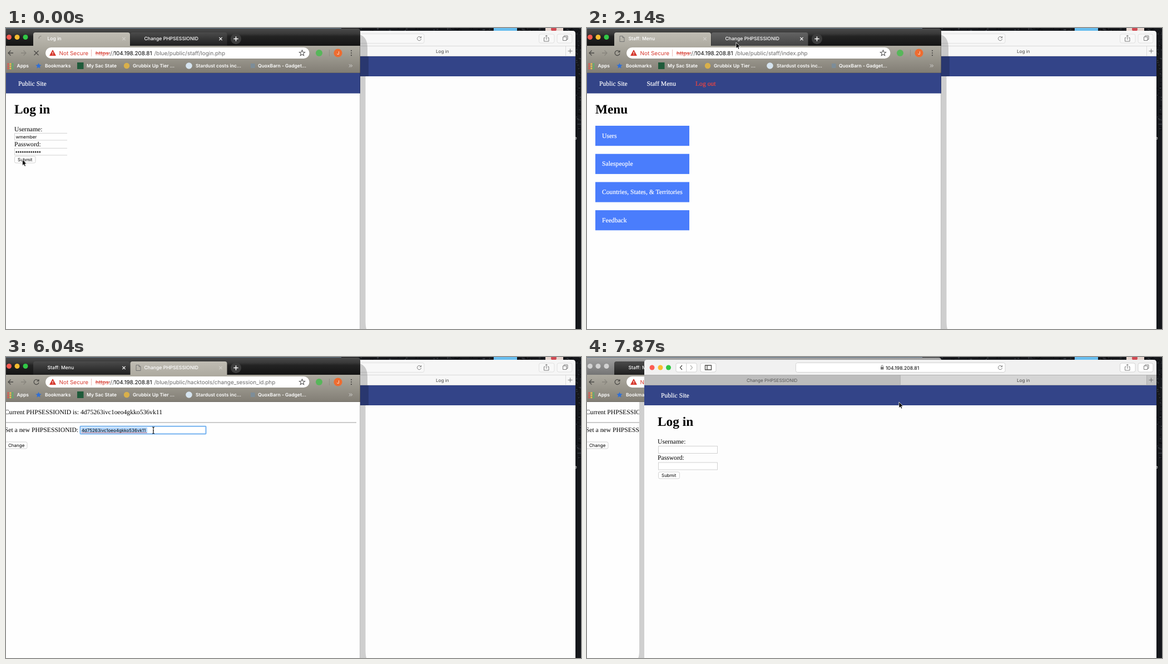
These frames come from a looping animation (1034x542 px, 8000 ms). An HTML page:

```html
<!DOCTYPE html>
<html lang="en">
<head>
<meta charset="utf-8">
<title>Session demo</title>
<style>
html, body { margin: 0; width: 100%; height: 100%; overflow: hidden; background: #15171b; }
svg { display: block; width: 1034px; height: 542px; text-rendering: geometricPrecision; }
text { font: 11.65px "Liberation Serif", Times, serif; white-space: pre; }
.h1 { font-size: 23.3px; font-weight: bold; }
.nav { fill: #fff; stroke: #fff; stroke-width: .2; }
.red { fill: #f4453f; stroke: #f4453f; }
.ui { font: 8px Inter, "Open Sans", sans-serif; }
.tab, .mark { font: 500 8.6px Inter, "Open Sans", sans-serif; fill: #fff; }
.mark { font-weight: 600; font-size: 8.5px; }
.url { font: 9.95px Inter, "Open Sans", sans-serif; }
.line { fill: none; stroke: #4b4a47; stroke-width: 1.3; }
.thin { fill: none; stroke: #6e6e6e; stroke-width: .9; }
</style>
</head>
<body>
<svg id="stage" viewBox="0 0 1034 542">
  <defs>
    <linearGradient id="strip" x2="0" y2="1">
      <stop stop-color="#4a4a4a"/><stop offset=".3" stop-color="#393939"/>
      <stop offset=".45" stop-color="#232323"/><stop offset="1" stop-color="#141414"/>
    </linearGradient>
    <linearGradient id="stripIdle" x2="0" y2="1">
      <stop stop-color="#a2a2a2"/><stop offset="1" stop-color="#747474"/>
    </linearGradient>
    <linearGradient id="tabOn" x2="0" y2="1">
      <stop stop-color="#c0bdb4"/><stop offset="1" stop-color="#aeaba1"/>
    </linearGradient>
    <linearGradient id="tabOff" x2="0" y2="1">
      <stop stop-color="#4b4b4b"/><stop offset="1" stop-color="#1f1f1f"/>
    </linearGradient>
    <linearGradient id="tabHover" x2="0" y2="1">
      <stop stop-color="#636363"/><stop offset="1" stop-color="#444"/>
    </linearGradient>
    <linearGradient id="bar" x2="0" y2="1">
      <stop stop-color="#aeaba1"/><stop offset="1" stop-color="#817d74"/>
    </linearGradient>
    <linearGradient id="fade">
      <stop stop-color="#bdbdbd"/><stop offset="1" stop-color="#f1f1f1"/>
    </linearGradient>
    <clipPath id="chromeClip"><path d="M0 1H632Q637 1 637 6V542H0Z"/></clipPath>
  </defs>
  <g id="desktop"></g>
  <g id="safari"></g>
  <g id="chrome"></g>
  <g id="pointer">
    <path id="arrow" d="M0 0V10.8L2.5 8.6 4.1 12.2 6 11.4 4.4 7.8H7.7Z" fill="#000" stroke="#fff" stroke-width=".8"/>
    <path id="beam" d="M-2 0Q0 0 0 1.5Q0 0 2 0M0 1V11M-2 12Q0 12 0 10.5Q0 12 2 12M-1 7H1" fill="none" stroke="#000"/>
  </g>
</svg>
<script>
const LOOP = 8000;
const SESSION = '4d75263ivc1oeo4gkko536vk11';
const NAVY = '#334488';
const $ = id => document.getElementById(id);

const rect = (x, y, w, h, fill, more = '') =>
  `<rect x="${x}" y="${y}" width="${w}" height="${h}" fill="${fill}" ${more}/>`;
const dot = (x, y, r, fill, more = '') =>
  `<circle cx="${x}" cy="${y}" r="${r}" fill="${fill}" ${more}/>`;
const text = (x, y, s, cls = '', more = '') =>
  `<text x="${x}" y="${y}" class="${cls}" ${more}>${s}</text>`;
const path = (d, cls = 'line', more = '') => `<path d="${d}" class="${cls}" ${more}/>`;
const group = (id, body, more = '') => `<g id="${id}" ${more}>${body}</g>`;
const range = (n, f) => Array.from({ length: n }, (_, i) => f(i)).join('');

const lights = (xs, y, colors) => xs.map((x, i) => dot(x, y, 4.5, colors[i])).join('');
const LIT = ['#fc5b52', '#f8bc30', '#31c746'];
const GREY = ['#d2d2d2', '#d2d2d2', '#d2d2d2'];

const button = (x, y, w, label, tx) =>
  rect(x, y, w, 12, '#fff', 'rx="2.5" stroke="#c6c6c6" stroke-width=".8"') + text(tx, y + 9, label, 'ui');
const field = (x, y, w, h = 13) =>
  rect(x, y, w, h, '#fff', 'stroke="#cdcdcd" stroke-width=".9"');
const star = (x, y, r) => 'M' + Array.from({ length: 10 }, (_, i) => {
  const a = i * Math.PI / 5 - Math.PI / 2, d = i % 2 ? r * .45 : r;
  return `${(x + d * Math.cos(a)).toFixed(2)} ${(y + d * Math.sin(a)).toFixed(2)}`;
}).join('L') + 'Z';
const cross = (x, y, r) => `M${x - r} ${y - r}l${2 * r} ${2 * r}m0 ${-2 * r}l${-2 * r} ${2 * r}`;
const plus = (x, y, r) => `M${x - r} ${y}h${2 * r}M${x} ${y - r}v${2 * r}`;
const reload = (x, y, r) =>
  `M${x + r * .8} ${y - r * .6}A${r} ${r} 0 1 0 ${x + r} ${y + r * .2}M${x + r} ${y - r * 1.1}v${r * .75}h${-r * .75}`;
const page = x => `M${x} 14.5h5l3 3v7h-8zM${x + 5} 14.5v3h3`;

function drawDesktop() {
  let seed = 7;
  const rand = () => (seed = seed * 16807 % 2147483647) / 2147483647;
  const speck = (x, y) => rect(x.toFixed(1), y.toFixed(1), (1 + rand() * 3).toFixed(1), 1.2,
    rand() < .5 ? '#3c4148' : '#08090b');
  return rect(0, 0, 1034, 542, '#15171b') +
    range(90, () => speck(637 + rand() * 395, rand() * 5)) +
    range(60, () => speck(1024 + rand() * 9, rand() * 190)) +
    rect(0, 0, 603, 3, '#5d7386') + rect(877, 0, 42, 6, '#67bdee') +
    rect(970, 0, 32, 6, '#e6d5ce') + dot(985, 2, 5, '#cf4a52') +
    text(1022, 201, 'e', 'ui', 'fill="#fff"');
}

function safariBar(front) {
  const edge = front ? '#cfcfcf' : '#dedede';
  const box = (x, y, w, h) => rect(x, y, w, h, front ? '#fff' : '#f8f8f8', `rx="3" stroke="${edge}" stroke-width=".9"`);
  const tabs = front
    ? rect(103, 32, 460, 19, '#bcbcbc') + rect(563, 32, 443, 19, '#d5d5d5') + rect(1006, 32, 18, 19, '#c2c2c2')
    : rect(103, 32, 921, 19, '#f7f7f7');
  return path('M103 51V10Q103 5 108 5H1019Q1024 5 1024 10V51Z', '', `fill="${front ? '#f1f1f1' : '#f6f6f6'}"`) +
    tabs + path('M103 32.5H1024M103 50.5H1024M563.5 32V50M1006.5 32V50', '', `stroke="${front ? '#aaa' : '#d4d4d4'}" stroke-width=".8"`) +
    lights([117, 132, 146.5], 19, LIT) +
    box(160, 11, 37.5, 16) + box(204, 11, 28, 16) + box(375.5, 10.5, 376.5, 17) +
    box(958.5, 11, 27.5, 16) + box(991, 11, 27, 16) +
    path('M178.8 11V27', '', `stroke="${edge}"`) +
    path('M171 15l-3.5 4 3.5 4M212.5 15h11v8h-11zM216 15v8') +
    path('M186 15l3.5 4-3.5 4', 'line', 'opacity=".4"') +
    path(reload(743, 19, 3.6) + 'M969.5 17.5h-2v6.5h8.5v-6.5h-2M971.8 21v-8m-2 2l2-2 2 2M1003.5 16v-2h6.5v6.5h-2M1001.5 16h6.5v6.5h-6.5z' + plus(1014.5, 41.5, 4), 'thin') +
    rect(528, 18, 5.5, 4.5, '#777') + path('M529.2 18v-1.5a1.6 1.6 0 0 1 3.2 0v1.5', 'thin') +
    text(537, 22.5, '104.198.208.81', 'ui', 'style="font-size:8.75px"') +
    text(287, 44.6, 'Change PHPSESSIONID', 'ui', 'fill="#555" style="font-size:8.1px"') +
    text(773, 44.6, 'Log in', 'ui', 'fill="#444" style="font-size:8.1px"');
}

function drawSafari() {
  return group('safariShade', path('M103 81H94V528Q94 538 92 542H103Z', '', 'fill="#cfcfcf"')) +
    rect(103, 50, 921, 492, '#fdfdfd') + group('barIdle', safariBar(false)) + group('barFront', safariBar(true)) +
    rect(103, 51, 921, 36, NAVY) + text(133, 73, 'Public Site', 'nav') +
    text(127, 123.5, 'Log in', 'h1') +
    text(127, 155.5, 'Username:') + field(128.5, 160.5, 106) +
    text(127, 185, 'Password:') + field(128.5, 190, 106) +
    button(128.5, 207, 38, 'Submit', 134);
}

const tabShape = x => `M${x} 32V12Q${x} 8 ${x + 4} 8H${x + 170}Q${x + 174} 8 ${x + 174} 12V32Z`;

function drawBookmarks() {
  const hues = ['#e2574c', '#efc04a', '#58b368', '#4d90e0'];
  const marks = [[19.5, 'Apps'], [70, 'Bookmarks'], [145, 'My Sac State'], [228, 'Grubbix Up Tier ...'],
    [341, 'Stardust costs inc...'], [453, 'QuoxBarn - Gadget...']];
  return range(9, i => rect(2.5 + i % 3 * 4, 63.5 + Math.floor(i / 3) * 4, 2.8, 2.8, hues[(i + Math.floor(i / 3)) % 4])) +
    path(star(58.5, 68.3, 5.4), '', 'fill="#2f6fd6"') +
    rect(128, 62, 11.5, 12, '#1f5a3a') + dot(217, 68, 5.2, '#d9b04a') +
    dot(329, 68, 5.8, '#d6e4f0') + rect(440, 64, 7.5, 8, '#7d8d99') +
    marks.map(([x, s]) => text(x, 71.3, s, 'mark')).join('') +
    path('M617 65.5l2.5 2.5-2.5 2.5m3-5l2.5 2.5-2.5 2.5', '', 'fill="none" stroke="#ddd"');
}

function drawToolbar() {
  return rect(0, 32, 637, 49, 'url(#bar)') + rect(0, 80, 637, 1, '#706d66') +
    path('M13 45H4m4.5-4.5L4 45l4.5 4.5') +
    path('M27 45h9m-4.5-4.5L36 45l-4.5 4.5', 'line', 'opacity=".3"') +
    group('stop', path(cross(54.5, 45, 4))) + group('reload', path(reload(54.5, 45, 4.4))) +
    rect(71, 35, 474.5, 20, '#fff', 'rx="10"') +
    path('M84 39.8L89.3 49.6H78.7Z', '', 'fill="#d6382d" stroke="#d6382d" stroke-linejoin="round"') +
    rect(83.5, 43, 1.1, 3.4, '#fff') + rect(83.5, 47.3, 1.1, 1.1, '#fff') +
    text(95.5, 48.5, 'Not Secure', 'url', 'fill="#d6382d"') + rect(153, 39, .8, 12, '#e9a9a4') +
    text(161, 48.5, '<tspan fill="#d6382d">https</tspan><tspan fill="#555">://</tspan>', 'url') +
    rect(160.5, 44.8, 27, .9, '#d6382d') +
    text(194, 48.5, '104.198.208.81', 'url') + text(266.5, 48.5, '', 'url', 'id="urlPath" fill="#6b6b6b"') +
    path(star(532.5, 45.2, 5.3), '', 'fill="none" stroke="#555" stroke-width="1.1"') +
    dot(563, 45, 6, '#57b65a') + rect(581, 39, .8, 12, '#8b887f') +
    dot(597, 45, 7.6, '#ee6c30') + text(595, 48, 'J', 'ui', 'fill="#fff"') +
    [40.8, 45, 49.2].map(y => dot(621, y, 1.1, '#4b4a47')).join('') + drawBookmarks();
}

function drawPages() {
  const items = ['Users', 'Salespeople', 'Countries, States, &amp; Territories', 'Feedback'];
  const login = text(15, 154, 'Log in', 'h1') + text(15, 186, 'Username:') + text(15, 213, 'Password:') +
    [189.5, 216.5].map(y => path(`M110 ${y}H15.5V${y + 12.5}H110`, '', 'fill="#fff" stroke="#cdcdcd" stroke-width=".9"')).join('') +
    text(17.5, 199, 'wmember', 'ui') + range(12, i => dot(18.8 + i * 3.82, 223.2, 1.3, '#111')) +
    button(15.5, 231, 37.5, 'Submit', 21);
  const menu = text(107.5, 104, 'Staff Menu', 'nav') + text(195, 104, 'Log out', 'nav red') +
    text(15, 154, 'Menu', 'h1') + items.map((s, i) =>
      rect(15, 176 + i * 50.7, 169, 36.2, '#4a7dfc', `id="item${i}"`) + text(27, 197.7 + i * 50.7, s, 'nav')).join('');
  const tool = rect(0, 81, 637, 37, '#fefefe') +
    text(-2.2, 103, 'Current PHPSESSIONID is: ' + SESSION) + rect(0, 117.5, 630, 1, '#9a9a9a') +
    text(-2.2, 135, 'Set a new PHPSESSIONID:') +
    rect(133.5, 124.8, 226, 13.7, '#fff', 'rx="1" stroke="#74b2f0" stroke-width="2"') +
    rect(135.5, 127, 118.5, 10, '#b0d4fb', 'id="selection"') + text(135.7, 135, SESSION, 'ui') +
    path('M136 136.4H254', '', 'id="squiggle" stroke="#e0453c" stroke-dasharray="1.2 .8"') +
    rect(254.2, 127, .9, 10, '#000', 'id="caret"') + button(-4, 153, 42, 'Change', 4);
  return rect(0, 81, 637, 461, '#fefefe') + rect(0, 81, 637, 36.7, NAVY) + text(22, 104, 'Public Site', 'nav') +
    group('login', login) + group('menu', menu) + group('tool', tool);
}

function drawChrome() {
  const shade = path('M637 12Q650 17 650 36V51H652V87H646.5V528Q646.5 537 648 542H637Z', '', 'fill="#000" opacity=".19"') +
    group('glow', rect(637, 122, 23, 116.5, 'url(#fade)'));
  const tabs = path(tabShape(49), '', 'id="tab0"') + path(tabShape(223.5), '', 'id="tab1"') +
    path(page(59), 'thin', 'id="page0"') + path(page(234), 'thin', 'id="page1"') +
    path('M59 19A4.5 4.5 0 0 1 63.5 14.5', '', 'id="spinner" fill="none" stroke="#858279" stroke-width="1.2"') +
    text(74.5, 22.3, '', 'tab', 'id="title0"') + text(248.5, 22.3, 'Change PHPSESSIONID', 'tab') +
    path(cross(212, 19.5, 2.6), '', 'id="close0" stroke="#fff" stroke-width="1.2"') +
    path(cross(386, 19.5, 2.6), '', 'id="close1" stroke="#fff" stroke-width="1.2"') +
    dot(413.5, 19.5, 9.5, '#3d3d3d') + path(plus(413.5, 19.5, 4.2), '', 'stroke="#fff" stroke-width="1.4"');
  return group('chromeShade', shade) + group('window',
    rect(0, 1, 637, 31, 'url(#strip)', 'id="titleStrip"') +
    group('lit', lights([5.5, 20, 35], 16.5, LIT)) + group('unlit', lights([5.5, 20, 35], 16.5, GREY)) +
    tabs + drawToolbar() + drawPages(), 'clip-path="url(#chromeClip)"') +
    rect(636, 32, 1, 510, '#000', 'opacity=".25"');
}

$('desktop').innerHTML = drawDesktop();
$('safari').innerHTML = drawSafari();
$('chrome').innerHTML = drawChrome();

// Pointer stops: time, x, y; each holds until the next.
const STOPS = [[0, 29.5, 237], [960, 70, 200], [1100, 115, 159], [1250, 210, 168], [1400, 308, 175],
  [1700, 300, 150], [1850, 288, 100], [1990, 275, 50], [2140, 268, 26], [2440, 267, 60], [2590, 265, 110],
  [2740, 265, 126], [7090, 330, 150], [7240, 650, 205], [7390, 790.5, 226], [7700, 690, 160], [7870, 561, 81]];

const show = (id, on) => $(id).style.display = on ? '' : 'none';
const fill = (id, value) => $(id).setAttribute('fill', value);
const set = (id, value) => { if ($(id).textContent !== value) $(id).textContent = value; };

function render(t) {
  const within = (a, b) => t >= a && t < b;
  const loading = t < 510, menuReady = t >= 300, toolOpen = t >= 2290, front = t >= 7540;

  const top = front ? 'safari' : 'chrome';
  if ($('pointer').previousElementSibling.id !== top) $('stage').insertBefore($(top), $('pointer'));

  show('login', !menuReady);
  show('menu', menuReady && !toolOpen);
  show('tool', toolOpen);
  set('title0', menuReady ? 'Staff: Menu' : 'Log in');
  set('urlPath', '/blue/public/' + (toolOpen ? 'hacktools/change_session_id.php' : menuReady ? 'staff/index.php' : 'staff/login.php'));

  show('spinner', loading);
  $('spinner').setAttribute('transform', `rotate(${Math.floor(t / 150) * 100} 63.5 19)`);
  show('stop', loading);
  show('reload', !loading);
  show('page0', !loading && !toolOpen);
  show('page1', toolOpen);
  fill('tab0', toolOpen ? 'url(#tabOff)' : 'url(#tabOn)');
  fill('tab1', toolOpen ? 'url(#tabOn)' : within(2140, 2290) ? 'url(#tabHover)' : 'url(#tabOff)');
  $('close0').setAttribute('opacity', toolOpen ? 1 : .35);
  $('close1').setAttribute('opacity', toolOpen ? .35 : 1);

  fill('item0', within(960, 1250) ? '#3f70e0' : '#4a7dfc');
  fill('item1', within(300, 960) ? '#3f70e0' : '#4a7dfc');

  show('selection', within(2740, 4840) || t >= 6040);
  show('squiggle', t >= 4840);
  show('caret', within(4840, 5290) || within(5740, 6040));

  fill('titleStrip', front ? 'url(#stripIdle)' : 'url(#strip)');
  show('lit', !front);
  show('unlit', front);
  show('barFront', front);
  show('barIdle', !front);
  show('safariShade', front);
  show('chromeShade', !front);
  show('glow', within(7240, 7540));

  const [, x, y] = STOPS.filter(s => s[0] <= t).pop();
  const typing = within(2740, 7090);
  show('arrow', !typing);
  show('beam', typing);
  $('pointer').setAttribute('transform', `translate(${x} ${y})`);
}

const start = performance.now();
function tick() {
  render((performance.now() - start) % LOOP);
  requestAnimationFrame(tick);
}
tick();
</script>
</body>
</html>
```
